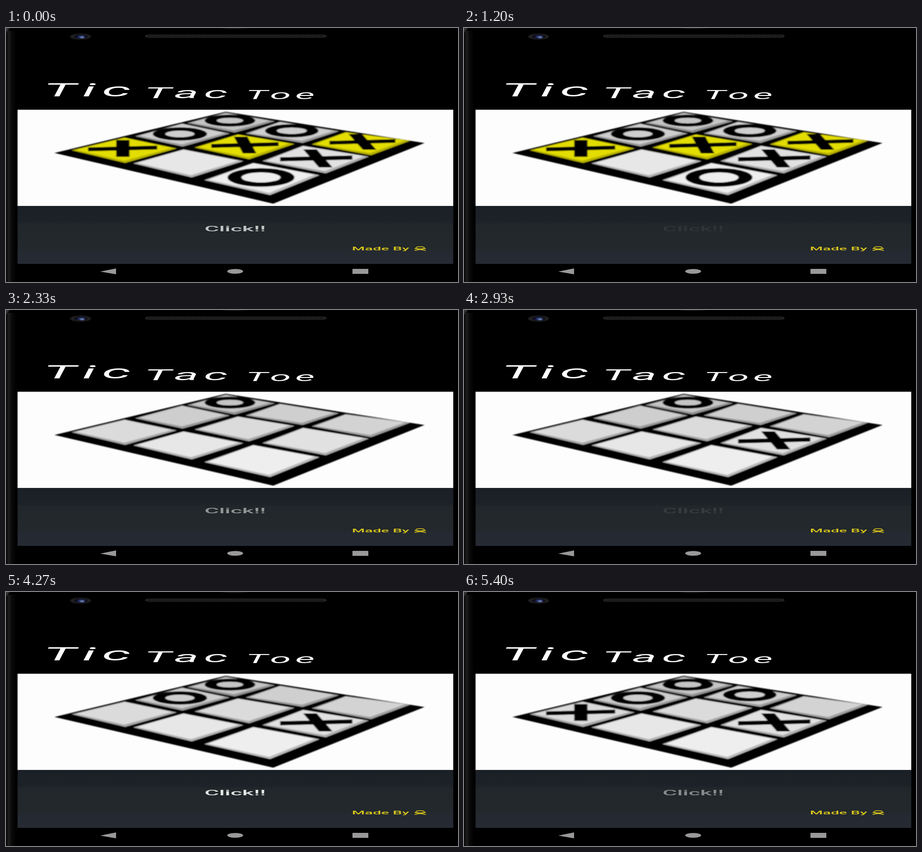
An HTML page for the animation above (5470 ms loop, 998x561 px).

```html
<!DOCTYPE html>
<html lang="en">
<head>
<meta charset="utf-8">
<title>Tic Tac Toe</title>
<style>
  html, body { margin: 0; width: 100%; height: 100%; overflow: hidden; background: #000; }
  svg { display: block; width: 998px; height: 561px; }
  text { font-family: Roboto, sans-serif; font-weight: 500; }
  .title text { fill: #fff; font-style: italic; font-weight: 400; letter-spacing: .11em; }
  .credit { fill: #dcc81c; font-size: 10.7px; }
</style>
</head>
<body>
<svg viewBox="0 0 998 561">
  <defs>
    <linearGradient id="edge">
      <stop offset="0" stop-color="#050505"/>
      <stop offset=".3" stop-color="#1e1e1e"/>
      <stop offset=".5" stop-color="#0c0c0c"/>
      <stop offset="1" stop-color="#000"/>
    </linearGradient>
    <linearGradient id="panel" x2="0" y2="1">
      <stop offset="0" stop-color="#1b2027"/>
      <stop offset=".28" stop-color="#1d2229"/>
      <stop offset=".32" stop-color="#21272a"/>
      <stop offset=".72" stop-color="#22282b"/>
      <stop offset=".78" stop-color="#252a32"/>
      <stop offset="1" stop-color="#262a33"/>
    </linearGradient>
    <filter id="soft"><feGaussianBlur stdDeviation="1.6 .9"/></filter>
  </defs>

  <!-- phone body -->
  <rect width="998" height="561"/>
  <rect y="6" width="22" height="555" fill="url(#edge)"/>
  <path d="M0 0H9Q3 3 0 12Z" fill="#444" filter="url(#soft)"/>
  <path d="M472 0H540Q506 3 472 0" fill="#222"/>
  <g filter="url(#soft)">
    <ellipse cx="164.5" cy="19" rx="23" ry="6.5" fill="#232323"/>
    <ellipse cx="165" cy="19" rx="15" ry="4.5" fill="#0b0d1c"/>
    <ellipse cx="166" cy="19.5" rx="8" ry="2.8" fill="#26356f"/>
    <ellipse cx="168" cy="20.5" rx="4" ry="1.2" fill="#8fa3d8"/>
  </g>
  <rect x="307" y="14.5" width="401" height="7" rx="8" ry="3.5" fill="#232323"/>
  <path d="M313 18H703" stroke="#111" stroke-width="3" stroke-dasharray="3 2"/>

  <!-- app screen -->
  <rect x="25.5" y="180.5" width="962" height="213" fill="#fdfdfd"/>
  <rect x="25.5" y="393" width="962" height="128" fill="url(#panel)"/>
  <g id="board" filter="url(#soft)"><path d="M107 276L485 185L924 254L590 388Z"/></g>

  <!-- the whole screen is widened, text included -->
  <g transform="scale(3.05 1)">
    <g class="title">
      <text x="27" y="151" font-size="41">Tic</text>
      <text x="100" y="155" font-size="34">Tac</text>
      <text x="173.5" y="157.5" font-size="27.5">Toe</text>
    </g>
    <text id="click" x="165.9" y="448.6" font-size="16.2" text-anchor="middle" fill="#fff">Click!!</text>
    <text class="credit" x="250.4" y="491">Made By</text>
  </g>
  <g fill="none" stroke="#dcc81c" stroke-width="1.5">
    <ellipse cx="914.5" cy="485.5" rx="9.5" ry="2.6"/>
    <path d="M902 487L927 491.5M927 487L902 491.5"/>
  </g>

  <g fill="#999">
    <path d="M208 538L243 531V544Z"/>
    <ellipse cx="506" cy="537.5" rx="17.5" ry="5.2"/>
    <rect x="765" y="532" width="35" height="11"/>
  </g>
</svg>
<script>
const LOOP = 5470, FRAME = 200 / 3;
const CLEAR = 1340;            // the finished game is wiped here
const FADE = 440, PEAK = 1657; // half period and one bright moment of the blink
const board = document.getElementById('board');
const click = document.getElementById('click');

function add(tag, attrs, parent) {
  const node = document.createElementNS('http://www.w3.org/2000/svg', tag);
  for (const key in attrs) node.setAttribute(key, attrs[key]);
  return parent.appendChild(node);
}

const gray = level => `rgb(${level},${level},${level})`;

// corners: left, top, right, bottom; o: centre, outer and inner radii
// x: bar ends and height, arm top and bottom, half height
const tiles = [
  { corners: [400,210, 485,187, 594,206, 505,231], shade: 197, o: [494.5,204.5, 56,13, 29,6.3], at: 2120 },
  { corners: [285,239, 389,211, 494,233, 390,262], shade: 206, o: [384,234, 60,14.5, 32,7.2], at: 3680 },
  { corners: [145,270, 262,242, 377,266, 263,298], shade: 219, x: [181,334,266, 258,258,18.5], at: 4460, wins: true },
  { corners: [529,233, 605,207, 735,228, 655,254], shade: 207, o: [631,227, 59,14.5, 33,7], at: 5240 },
  { corners: [416,264, 512,235, 637,256, 537,290], shade: 219, x: [453,602,258.5, 518,538,18.5], wins: true },
  { corners: [281,299, 392,268, 524,294, 410,330], shade: 231 },
  { corners: [675,257, 750,230, 892,249, 806,281], shade: 211, x: [714,860,251.5, 771,803,17.5], wins: true },
  { corners: [566,294, 656,260, 801,284, 706,321], shade: 225, x: [605,765,288, 671,706,20], at: 2900 },
  { corners: [438,336, 546,298, 692,325, 583,369], shade: 238, o: [563,330, 74,20.5, 43,11] }
];

for (const tile of tiles) {
  const [lx, ly, tx, ty, rx, ry, bx, by] = tile.corners;
  tile.bevel = add('polygon', { points: tile.corners }, board);
  tile.face = add('polygon', {
    points: [lx + 9, ly - 1, tx, ty + 1, rx - 11, ry - 1, bx - 2, by - 5]
  }, board);
  tile.mark = add('g', {}, board);
  if (tile.o) {
    const [cx, cy, outX, outY, inX, inY] = tile.o;
    add('ellipse', { cx, cy, rx: outX, ry: outY }, tile.mark);
    add('ellipse', { cx, cy, rx: inX, ry: inY, fill: gray(tile.shade) }, tile.mark);
  }
  if (tile.x) {
    const [x1, x2, y, top, bottom, h] = tile.x;
    add('path', { d: `M${x1} ${y + 2}L${x2} ${y - 2}`, stroke: '#000', 'stroke-width': h * .46 }, tile.mark);
    add('path', { d: `M${top - 15} ${y - h}h30L${bottom + 15} ${y + h}h-30Z` }, tile.mark);
  }
}

function draw(t) {
  const finished = t < CLEAR;
  for (const { bevel, face, mark, shade, at = Infinity, wins } of tiles) {
    const gold = finished && wins;
    face.setAttribute('fill', gold ? '#e3de06' : gray(shade));
    bevel.setAttribute('fill', gold ? '#b9b400' : gray(shade - 50));
    mark.setAttribute('visibility', finished || t >= at ? 'visible' : 'hidden');
  }
  const phase = Math.abs(t - PEAK) / FADE % 2;
  click.setAttribute('opacity', Math.max(.06, .95 * Math.abs(1 - phase)));
}

function tick() {
  const t = performance.now() % LOOP;
  draw(Math.floor((t + 4) / FRAME) * FRAME);
  requestAnimationFrame(tick);
}
tick();
</script>
</body>
</html>
```
